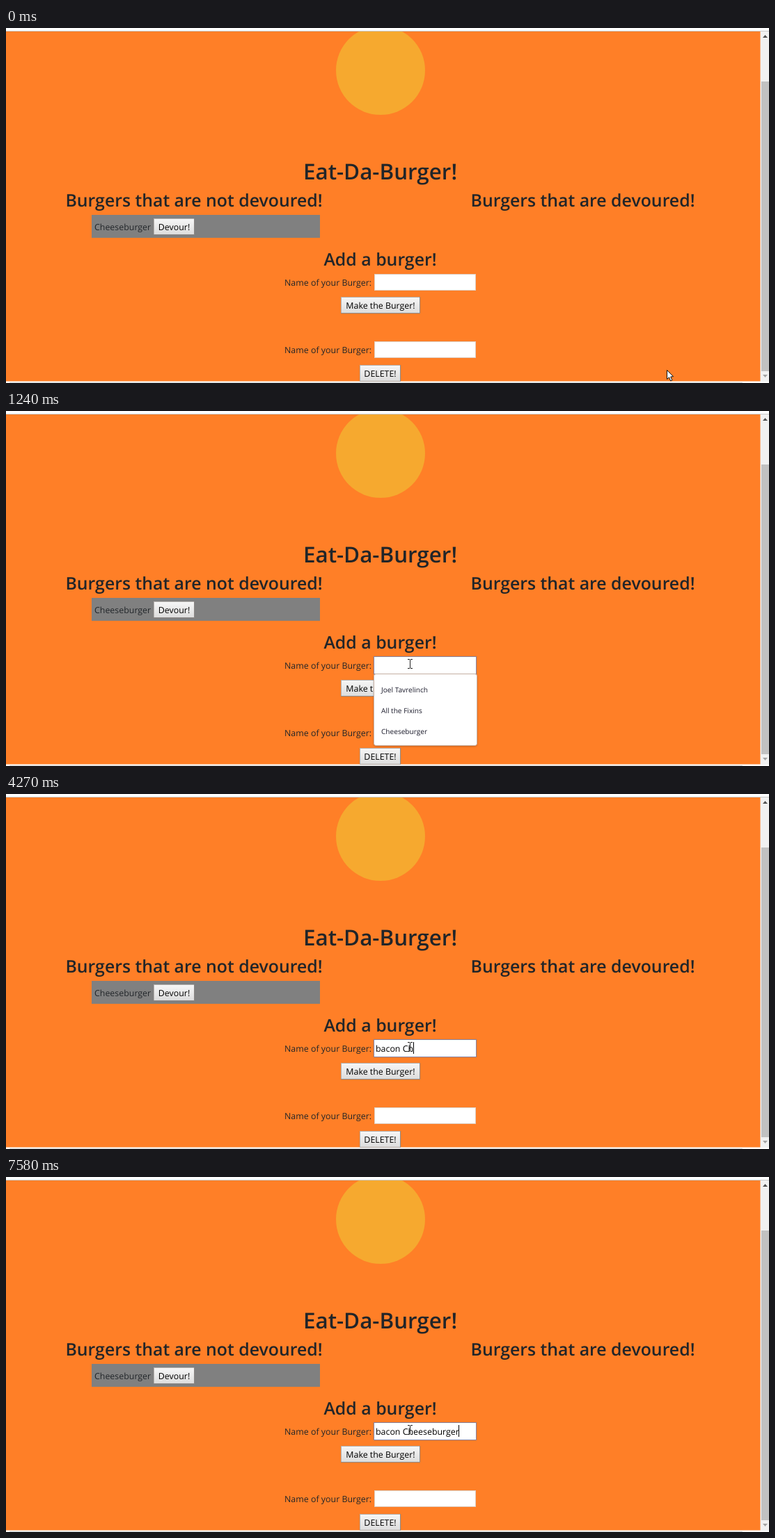
Write an HTML page with a canvas that moves like this. It is 1096 by 511 pixels and loops after 8000 ms.

```html
<!DOCTYPE html>
<html lang="en">
<head>
<meta charset="utf-8">
<title>Eat-Da-Burger!</title>
<style>
  html, body { margin: 0; width: 100%; height: 100%; overflow: hidden; background: #fff; }
  canvas { display: block; }
</style>
</head>
<body>
<canvas id="stage" width="1096" height="511"></canvas>
<script>
const ctx = document.getElementById('stage').getContext('2d');
const LOOP = 8000;
const FAMILY = '"Open Sans", "Noto Sans", sans-serif';
const ORANGE = '#ff7f27', INK = '#212529';
const BODY = 12.4, HEAD = 24.85;

const TYPED = 'bacon Cheeseburger';
const KEY_TIMES = [1740, 1870, 2500, 2730, 2900, 3130, 3810, 4270, 4980,
  5280, 5680, 5910, 6480, 6790, 6940, 7240, 7410, 7580];
const CARET_OFF = [[1240, 1740], [2420, 2500], [3660, 3810], [4820, 4980]];
const CLICK = 690, FOCUS = 850;

function rect(x, y, w, h, fill) {
  ctx.fillStyle = fill;
  ctx.fillRect(x, y, w, h);
}

function frame(x, y, w, h, color) {
  ctx.strokeStyle = color;
  ctx.lineWidth = 1;
  ctx.strokeRect(x + 0.5, y + 0.5, w - 1, h - 1);
}

function disc(x, y, r, fill) {
  ctx.fillStyle = fill;
  ctx.beginPath();
  ctx.arc(x, y, r, 0, Math.PI * 2);
  ctx.fill();
}

function poly(points, fill) {
  ctx.beginPath();
  points.forEach(([x, y]) => ctx.lineTo(x, y));
  ctx.closePath();
  ctx.fillStyle = fill;
  ctx.fill();
}

function label(str, x, y, { size = BODY, weight = 400, align = 'left', color = INK } = {}) {
  ctx.font = `${weight} ${size}px ${FAMILY}`;
  ctx.textAlign = align;
  ctx.fillStyle = color;
  ctx.fillText(str, x, y);
}

function heading(str, x, y, size = HEAD) {
  label(str, x, y, { size, weight: 600, align: 'center' });
}

function button(str, x, y, w) {
  const shade = ctx.createLinearGradient(0, y, 0, y + 24);
  shade.addColorStop(0, '#f7f7f7');
  shade.addColorStop(1, '#dcdcdc');
  rect(x, y, w, 24, shade);
  frame(x, y, w, 24, '#b3afac');
  rect(x, y + 23, w, 1, '#8c8886');
  rect(x + w - 1, y, 1, 24, '#8c8886');
  label(str, x + w / 2, y + 16.7, { align: 'center', color: '#000' });
}

function field(y) {
  label('Name of your Burger:', 400, y + 17);
  rect(529, y, 146, 24, '#fff');
  frame(529, y, 146, 24, '#ddcdc2');
}

function scrollbar() {
  rect(1083.5, 5, 12.5, 504, '#f1f1f1');
  rect(1085, 77, 11, 417, '#c1c1c1');
  poly([[1087, 14], [1090.5, 10], [1094, 14]], '#505050');
  poly([[1087, 499], [1090.5, 503], [1094, 499]], '#a3a3a3');
}

function page() {
  rect(0, 0, 1096, 511, '#fff');
  rect(0, 4, 1096, 1, '#c9c9c9');
  ctx.save();
  ctx.beginPath();
  ctx.rect(0, 5, 1084, 503.5);
  ctx.clip();
  rect(0, 5, 1084, 504, ORANGE);
  disc(538, 61, 64, '#f6a92f');
  heading('Eat-Da-Burger!', 537.5, 218, 31.4);
  heading('Burgers that are not devoured!', 270, 257);
  heading('Burgers that are devoured!', 828.5, 257);
  rect(123, 269, 328, 33, '#808080');
  label('Cheeseburger', 127, 290.7);
  button('Devour!', 212, 274, 59);
  heading('Add a burger!', 537.5, 341.5);
  field(354);
  button('Make the Burger!', 481, 387, 114);
  field(451);
  button('DELETE!', 508, 485, 59);
  ctx.restore();
  rect(5, 510, 1053, 1, '#cfcfcf');
  scrollbar();
}

function suggestions() {
  ctx.save();
  ctx.shadowColor = 'rgba(0,0,0,.3)';
  ctx.shadowBlur = 3;
  ctx.shadowOffsetY = 1;
  ctx.fillStyle = '#fff';
  ctx.beginPath();
  ctx.roundRect(528.5, 378.5, 148, 103, 3);
  ctx.fill();
  ctx.restore();
  ctx.strokeStyle = '#c9b3a6';
  ctx.stroke();
  ['Joel Tavrelinch', 'All the Fixins', 'Cheeseburger'].forEach((name, i) =>
    label(name, 539, 404.5 + i * 30, { size: 10.1, color: '#1c1c2c' }));
}

function activeField(t) {
  const str = TYPED.slice(0, KEY_TIMES.filter(k => k <= t).length);
  rect(528, 353, 148, 26, '#fff');
  frame(528, 353, 148, 26, '#827f9e');
  label(str, 531, 371, { color: '#000' });
  if (!CARET_OFF.some(([from, to]) => t >= from && t < to)) {
    rect(Math.round(530.5 + ctx.measureText(str).width), 357, 1, 17, '#000');
  }
  if (!str) suggestions();
}

function arrow(x, y) {
  ctx.save();
  ctx.translate(x + 0.5, y + 0.5);
  poly([[0, 0], [0, 13], [3, 10.3], [5.2, 15.5], [7.4, 14.5], [5.2, 9.5], [9, 9.2]], '#fff');
  ctx.strokeStyle = '#111';
  ctx.lineWidth = 1;
  ctx.stroke();
  ctx.restore();
}

function beam(x, y) {
  rect(x, y - 6, 1, 12, '#222');
  for (const end of [y - 7, y + 6]) {
    rect(x - 3, end, 3, 1, '#222');
    rect(x + 1, end, 3, 1, '#222');
  }
}

function pointer(t) {
  const step = Math.max(0, Math.min(8, Math.floor((t - 70) / 65.7) + 1));
  const p = step / 8, ease = p * p * (3 - 2 * p);
  const x = Math.round(949 - 369 * ease), y = Math.round(492 - 128 * ease);
  const overField = x > 529 && x < 675 && (y > 354 && y < 378 || y > 451 && y < 475);
  if (t >= CLICK && t < FOCUS) disc(579, 363, 10, '#ffff6e');
  (overField ? beam : arrow)(x, y);
}

function draw(now) {
  const t = now % LOOP;
  ctx.textRendering = 'geometricPrecision';
  page();
  if (t >= FOCUS) activeField(t);
  pointer(t);
}

const start = performance.now();
function tick() {
  draw(performance.now() - start);
  requestAnimationFrame(tick);
}
tick();
</script>
</body>
</html>
```
